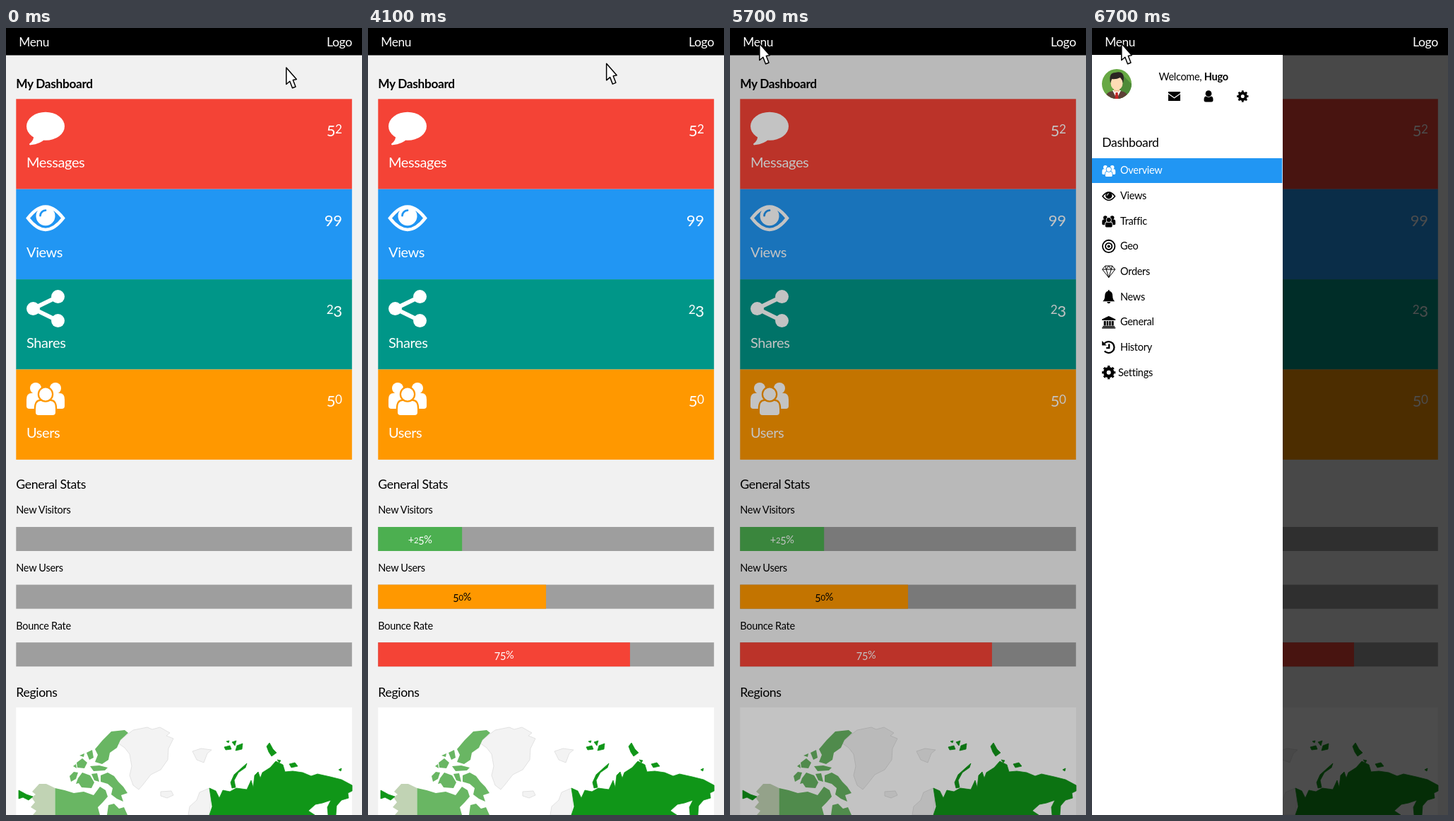
These frames come from a looping animation (504 px wide and 1112 px high, 7.7 s). An HTML page:

```html
<!DOCTYPE html>
<html lang="en">
<head>
<meta charset="utf-8">
<title>Dashboard</title>
<style>
  html, body { margin: 0; width: 100%; height: 100%; overflow: hidden; background: #f1f1f1; }
  svg { display: block; width: 100%; height: 100%; }
  text { font-family: Lato, "Open Sans", sans-serif; letter-spacing: -.02em; }
  .line { fill: none; stroke: currentColor; }
</style>
</head>
<body>
<svg id="stage" viewBox="0 0 504 1112"></svg>
<script>
const LOOP = 7700, BAR = 475.5;
const RED = '#f44336', BLUE = '#2196f3', TEAL = '#009688', ORANGE = '#ff9800', GREEN = '#4caf50';

const icons = {
  bubble: `<ellipse cx="27" cy="20" rx="27" ry="20"/><path d="M10 33Q11 40 4 45Q4 47 6 46.500Q20 45 26 38Z"/>`,
  eye: `<path class="line" stroke-width="4.5" d="M2 17.500Q27 -15 52 17.500Q27 50 2 17.500Z"/>
    <circle cx="27" cy="14.500" r="13.500"/>
    <path d="M19.500 14a7.500 7.500 0 0 1 7.500 -7.500" fill="none" stroke="var(--bg)" stroke-width="2.8" stroke-linecap="round"/>`,
  share: `<path class="line" stroke-width="6" d="M44.500 9.500L9.500 26.500L44.500 43.500"/>
    <circle cx="9.500" cy="26.500" r="9.500"/><circle cx="44.500" cy="9.500" r="9.500"/><circle cx="44.500" cy="43.500" r="9.500"/>`,
  users: `<circle cx="13" cy="8" r="8"/><circle cx="41" cy="8" r="8"/>
    <path d="M0 33V24Q0 15 7 15H47Q54 15 54 24V33Q54 37 50 37H4Q0 37 0 33Z"/>
    <g stroke="var(--bg)" stroke-width="4.500" paint-order="stroke">
    <path d="M13 42V37Q13 26 20 26H34Q41 26 41 37V42Q41 46 37 46H17Q13 46 13 42Z"/>
    <circle cx="27" cy="16.500" r="9"/></g>`,
  target: `<g class="line" stroke-width="1.800"><circle r="8.700"/><circle r="4.600"/></g><circle r="2"/>`,
  diamond: `<path class="line" d="M-5 -8H5L9 -3L0 8.500L-9 -3ZM-9 -3H9M-5 -8L-3.500 -3L0 8.500L3.500 -3L5 -8M-3.500 -3L0 -8L3.500 -3"/>`,
  bell: `<path d="M-1 -9.500H1V-8Q5.500 -7 5.500 -1Q5.500 4 8.500 6.500H-8.500Q-5.500 4 -5.500 -1Q-5.500 -7 -1 -8ZM-2.500 7.300H2.500Q2 9.500 0 9.500T-2.500 7.300Z"/>`,
  bank: `<path d="M0 -8.500L9.500 -4V-2.500H-9.500V-4ZM-7 -1.500H-4V5H-7ZM-3 -1.500H-.5V5H-3ZM.5 -1.500H3V5H.5ZM4 -1.500H7V5H4ZM-8.500 5.500H8.500V7H-8.500ZM-9.500 7.500H9.500V9H-9.500Z"/>`,
  history: `<path class="line" stroke-width="2.300" d="M-6 -5.500A8 8 0 1 1 -6 5.500M.5 -4.500V1H-3.500"/><path d="M-9.500 -9V-2.500H-3Z"/>`,
  cog: `<circle class="line" r="5.300" stroke-width="4.600"/>
    <circle class="line" r="8" stroke-width="3.200" pathLength="16" stroke-dasharray="1 1" stroke-dashoffset=".5"/>`,
  mail: `<path d="M-8.500 -6.500H8.500V-4.500L0 1.500L-8.500 -4.500ZM-8.500 -3L0 3L8.500 -3V6.500H-8.500Z"/>`,
  person: `<circle cy="-3.800" r="4.400"/><path d="M-6.500 5Q-6.500 0 -3.500 0Q0 2.500 3.500 0Q6.500 0 6.500 5Q6.500 8 4 8H-4Q-6.500 8 -6.500 5Z"/>`
};

const icon = (name, x, y, k = 1, fg = '#000', bg = '#fff') =>
  `<g transform="translate(${x} ${y}) scale(${k})" fill="${fg}" style="color:${fg};--bg:${bg}">${icons[name]}</g>`;
const rect = (x, y, w, h, fill, more = '') =>
  `<rect x="${x}" y="${y}" width="${w}" height="${h}" fill="${fill}" ${more}/>`;
const text = (x, y, size, str, more = '') =>
  `<text x="${x}" y="${y}" font-size="${size}" ${more}>${str}</text>`;
const shape = (fill, d) => `<path fill="${fill}" d="${d}"/>`;

// Old-style figures: low 0-2, hanging 3, 4, 5, 7 and 9
const figures = s => s.replace(/\d/g, c =>
  c < 3 ? `<tspan font-size=".78em">${c}</tspan>`
  : '68'.includes(c) ? c : `<tspan baseline-shift="-.17em">${c}</tspan>`);

const cards = [
  ['Messages', 52, RED, 'bubble', 18.5],
  ['Views', 99, BLUE, 'eye', 23.5],
  ['Shares', 23, TEAL, 'share', 15],
  ['Users', 50, ORANGE, 'users', 18.5]
].map(([name, n, color, pic, top], i) => {
  const y = 100.3 + i * 127.4;
  return rect(14.3, y, BAR, 127.4, color) + icon(pic, 29, y + top, 1, '#fff', color) +
    text(29, y + 96.7, 20, name, 'fill="#fff"') +
    text(475.5, y + 48.5, 22, figures('' + n), 'fill="#fff" text-anchor="end"');
}).join('');

const bars = [
  { name: 'New Visitors', part: .25, label: '+25%', color: GREEN, ink: '#fff' },
  { name: 'New Users', part: .5, label: '50%', color: ORANGE, ink: '#000' },
  { name: 'Bounce Rate', part: .75, label: '75%', color: RED, ink: '#fff' }
];
const stats = bars.map((b, i) => {
  const y = 705 + i * 81.6;
  return text(14.3, y - 18.7, 14.5, b.name) + rect(14.3, y, BAR, 34, '#9e9e9e') +
    rect(14.3, y, 0, 34, b.color, `id="bar${i}"`) +
    text(14.3 + BAR * b.part / 2, y + 22.5, 14.5, figures(b.label), `id="label${i}" fill="${b.ink}" text-anchor="middle"`);
}).join('');

const LAND = '#69b663', RUSSIA = '#109618';
const map = rect(14.3, 960, BAR, 152, '#fff') +
  `<g stroke="#dcdcdc" stroke-width=".8">` +
  shape('#f3f3f3', 'M158 1010L168 1001L180 992L200 988L207 991L218 988L232 996L227 1000L237 1004L230 1018L229 1034L219 1048L205 1055L194 1069L188 1076L180 1070L175 1056L178 1043L175 1026L168 1017Z') +
  shape('#f3f3f3', 'M258 1112L260 1100L270 1091L274 1080L288 1074L291 1080L288 1112Z') +
  shape('#f3f3f3', 'M264 1022L276 1018L291 1020L285 1025L280 1038L270 1034Z') +
  shape('#f3f3f3', 'M219 1079L234 1078L237 1084L228 1088L219 1085Z') + '</g>' +
  shape('#c1d3b4', 'M69.500 1074V1112H38L43 1106L35 1101L41 1094L36 1087L42 1083L37 1079L47 1068L57 1068Z') +
  shape(LAND, 'M69.500 1074L83 1077L96 1081L110 1079L124 1084L133 1072L141 1077L144 1086L137 1094L130 1101L133 1112H69.500Z') +
  shape(LAND, 'M143 1112L145 1098L153 1096L160 1103L167 1101L172 1112Z') +
  shape(LAND, 'M126 1019L137 1006L149 994L168 992L173 996L162 1006L157 1017L147 1024L145 1034L136 1040L126 1037L130 1027Z') +
  shape(LAND, 'M134 1056L144 1052L153 1057L159 1065L166 1072L172 1081L163 1084L166 1093L157 1089L149 1083L151 1074L144 1068L134 1065Z') +
  shape(LAND, 'M102 1060L108 1052L119 1056L125 1066L121 1074L107 1073L103 1067L99 1068ZM90 1057L96 1051L102 1052L99 1061L92 1065Z') +
  shape(LAND, 'M100 1038L108 1032L115 1038L111 1046L101 1045ZM114 1024L122 1020L124 1031L118 1034ZM119 1043L132 1042L144 1045L140 1049L124 1050ZM121 1054L129 1053L132 1065L125 1063ZM95 1043L99 1040L100 1046ZM104 1028L111 1025L110 1030Z') +
  `<g fill="${RUSSIA}" stroke="${RUSSIA}" stroke-width=".8" stroke-linejoin="round">
  <path d="M288 1074L297 1078L302 1088L307 1077L317 1079L326 1074L341 1076L347 1063L350 1073L352 1056L357 1051L360 1060L363 1052L374 1045L382 1036L392 1041L395 1051L406 1050L420 1052L432 1057L441 1054L459 1058L475 1062L490 1070V1078L484 1081L485 1088L475 1091L468 1099L467 1112H456L455 1101L460 1091L448 1095L438 1097L428 1106L437 1112H288L292 1100Z"/>
  <path d="M318 1066L323 1055L333 1046L341 1039L339 1045L329 1052L323 1063L325 1073L320 1074Z"/>
  <path d="M309 1016L317 1014L319 1019L311 1020ZM320 1009L326 1007L324 1014ZM327 1014L335 1011L334 1019L325 1021ZM312 1008L316 1007L315 1010Z"/>
  <path d="M369 1015L373 1010L378 1019L383 1024L376 1029L372 1023ZM401 1040L409 1038L413 1043L404 1045ZM384 1034L389 1035L387 1038ZM471 1048L475 1046L474 1050Z"/>
  <path d="M18 1077L29 1083L38 1086L32 1091L24 1087L18 1089Z"/></g>`;

const avatar = `<clipPath id="round"><circle cx="35" cy="79" r="21"/></clipPath><g clip-path="url(#round)">` +
  rect(14, 58, 42, 42, '#67a844') + shape('#4e8b38', 'M43 66L60 83V104H35Z') +
  shape('#5d4037', 'M18 102Q18 90 30 89H40Q52 90 52 102Z') + shape('#fff', 'M29 88H41L35 100Z') +
  shape('#c62828', 'M33.500 91H36.500L37.500 100H32.500Z') + rect(31, 82, 8, 8, '#efc39a') +
  `<ellipse cx="35" cy="78" rx="8.500" ry="10" fill="#ffdcb5"/>` +
  shape('#2b2523', 'M26 78Q23 63 33 63Q45 60 45 71L44 78Q43 73 40 70Q34 73 28 72Z') + '</g>';

const items = [
  ['Overview', 'users'], ['Views', 'eye'], ['Traffic', 'users'], ['Geo', 'target'], ['Orders', 'diamond'],
  ['News', 'bell'], ['General', 'bank'], ['History', 'history'], ['Settings', 'cog']
].map(([name, pic], i) => {
  const y = 201.5 + i * 35.65, ink = i ? '#000' : '#fff';
  const mark = pic === 'users' ? icon(pic, 14.3, y - 7.5, .35, ink, i ? '#fff' : BLUE)
    : pic === 'eye' ? icon(pic, 14.3, y - 5.5, .35) : icon(pic, 23.7, y);
  return mark + text(pic === 'cog' ? 37 : 40, y + 4.8, 14.5, name, `fill="${ink}"`);
}).join('');

const menu = `<g id="menu">` + rect(0, 38, 270, 1074, '#fff') + avatar +
  text(94.5, 74, 14.5, 'Welcome, <tspan font-weight="bold">Hugo</tspan>') +
  icon('mail', 116.5, 96.5) + icon('person', 165, 96.5) + icon('cog', 213.3, 96.5, .85) +
  text(14.3, 168, 17.5, 'Dashboard') + rect(0, 184, 269.3, 35, BLUE) + items + '</g>';

const $ = id => document.getElementById(id);
$('stage').innerHTML = rect(0, 0, 504, 1112, '#f1f1f1') +
  text(14.3, 85, 17.3, 'My Dashboard', 'font-weight="bold"') + cards +
  text(14.3, 651.3, 17.7, 'General Stats') + stats +
  text(14.3, 944.7, 17.7, 'Regions') + map +
  rect(0, 38, 504, 1074, '#000', 'id="shade"') +
  rect(0, 0, 504, 38.5, '#000') +
  text(18.3, 25.5, 17.3, 'Menu', 'fill="#fff"') +
  text(490, 25.5, 17.7, 'Logo', 'fill="#fff" text-anchor="end"') + menu +
  `<path id="cursor" fill="#fff" stroke="#000" stroke-width="1.500" stroke-linejoin="round"
    d="M.8 1V24.500L5.800 20.300L9.500 29.800L14 28L10.300 18.500L15.300 17.500Z"/>`;

// Steps of 100 ms done since a start, at most n
const steps = (t, start, n) => Math.max(0, Math.min(n, Math.floor((t - start) / 100) + 1));

function draw(now) {
  const t = now % LOOP;
  const grown = steps(t, 1000, 11) * 32.75;
  bars.forEach(({ part }, i) => {
    const full = BAR * part;
    $('bar' + i).setAttribute('width', Math.min(full, grown));
    $('label' + i).setAttribute('visibility', grown >= full ? 'visible' : 'hidden');
  });
  const move = steps(t, 4100, 6) / 6;
  $('cursor').setAttribute('transform', `translate(${396 - 355 * move} ${55 - 34 * move})`);
  $('shade').setAttribute('opacity', .7 * steps(t, 5600, 6) / 6);
  $('menu').setAttribute('transform', `translate(${45 * steps(t, 6200, 6) - 270} 0)`);
  requestAnimationFrame(draw);
}
draw(performance.now());
</script>
</body>
</html>
```
